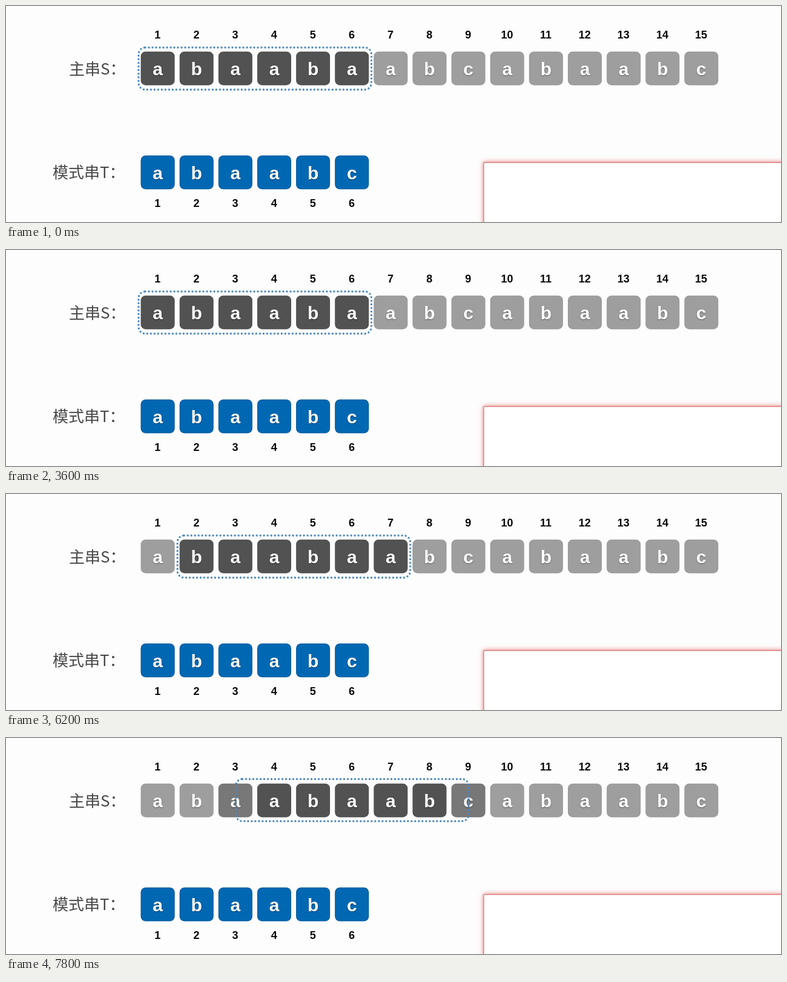
An HTML page with a canvas that plays this animation: 1280x359 px, repeating every 8000 ms.

```html
<!DOCTYPE html>
<html lang="zh-CN">
<head>
<meta charset="utf-8">
<title>String matching</title>
<style>
html, body { margin: 0; width: 100%; height: 100%; overflow: hidden; background: #fdfdfd; }
canvas { display: block; }
</style>
</head>
<body>
<canvas id="stage" width="1280" height="359"></canvas>
<script>
const ctx = document.getElementById("stage").getContext("2d");
const LOOP = 8000, SLIDE = 500;
const MOVES = [3700, 6300, 7550];
const TEXT = "abaabaabcabaabc", PATTERN = "abaabc";
const SIZE = 56, PITCH = 64.13, LEFT = 222.6;
const LIGHT = 158, DARK = 82;
const BOLD = "'Liberation Sans', Arial, sans-serif";

const clamp = v => Math.min(1, Math.max(0, v));
const ease = v => (1 - Math.cos(Math.PI * clamp(v))) / 2;
const cellX = i => LEFT + i * PITCH;

function windowPos(t) {
  return MOVES.reduce((sum, start) => sum + ease((t - start) / SLIDE), 0);
}

function roundRect(x, y, w, h, r) {
  ctx.beginPath();
  ctx.roundRect(x, y, w, h, r);
}

function write(text, x, y, font, color, align = "center") {
  ctx.font = font;
  ctx.fillStyle = color;
  ctx.textAlign = align;
  ctx.fillText(text, x, y);
}

function cell(i, y, letter, fill, edge) {
  const x = cellX(i);
  roundRect(x, y, SIZE, SIZE, 8);
  ctx.fillStyle = fill;
  ctx.fill();
  roundRect(x + 0.5, y + 0.5, SIZE - 1, SIZE - 1, 7.5);
  ctx.strokeStyle = edge;
  ctx.lineWidth = 1;
  ctx.stroke();
  ctx.save();
  ctx.shadowColor = "rgba(0,0,0,0.4)";
  ctx.shadowBlur = 2;
  ctx.shadowOffsetY = 1;
  write(letter, x + SIZE / 2, y + 39, `bold 30px ${BOLD}`, "#fff");
  ctx.restore();
}

function indices(count, y) {
  for (let i = 0; i < count; i++) {
    write(i + 1, cellX(i) + SIZE / 2 - 0.3, y, `bold 18px ${BOLD}`, "#080808");
  }
}

function label(text, x, y) {
  write(text, x, y, "26px 'Noto Sans CJK SC', 'Noto Sans CJK', sans-serif", "#484848", "left");
}

function panel() {
  ctx.save();
  ctx.shadowColor = "rgba(222,50,50,0.75)";
  ctx.shadowBlur = 8;
  ctx.fillStyle = "#fff";
  ctx.fillRect(789, 260, 600, 200);
  ctx.restore();
  ctx.strokeStyle = "#df8585";
  ctx.lineWidth = 1.5;
  ctx.strokeRect(789, 260.2, 600, 200);
}

function dottedBox(pos) {
  const y = 69 - clamp(pos - 1) * 0.8;
  ctx.save();
  roundRect(219 + pos * PITCH, y, 384.5, 70, 11);
  ctx.strokeStyle = "#4a87c3";
  ctx.lineWidth = 3.4;
  ctx.lineCap = "round";
  ctx.setLineDash([0, 6]);
  ctx.stroke();
  ctx.restore();
}

function draw(t) {
  const pos = windowPos(t);
  ctx.fillStyle = "#fdfdfd";
  ctx.fillRect(0, 0, 1280, 359);
  panel();
  label("主串S：", 104, 114);
  label("模式串T：", 77, 286);
  indices(TEXT.length, 54);
  indices(PATTERN.length, 334);
  [...TEXT].forEach((letter, i) => {
    const inside = clamp(i - pos + 1) * clamp(pos + PATTERN.length - i);
    const v = Math.round(LIGHT + (DARK - LIGHT) * inside);
    cell(i, 75.7, letter, `rgb(${v},${v},${v})`, "rgba(0,0,0,0.04)");
  });
  [...PATTERN].forEach((letter, i) => cell(i, 248.5, letter, "#0068b3", "rgba(0,30,70,0.25)"));
  dottedBox(pos);
}

function tick() {
  draw(performance.now() % LOOP);
  requestAnimationFrame(tick);
}
tick();
</script>
</body>
</html>
```
